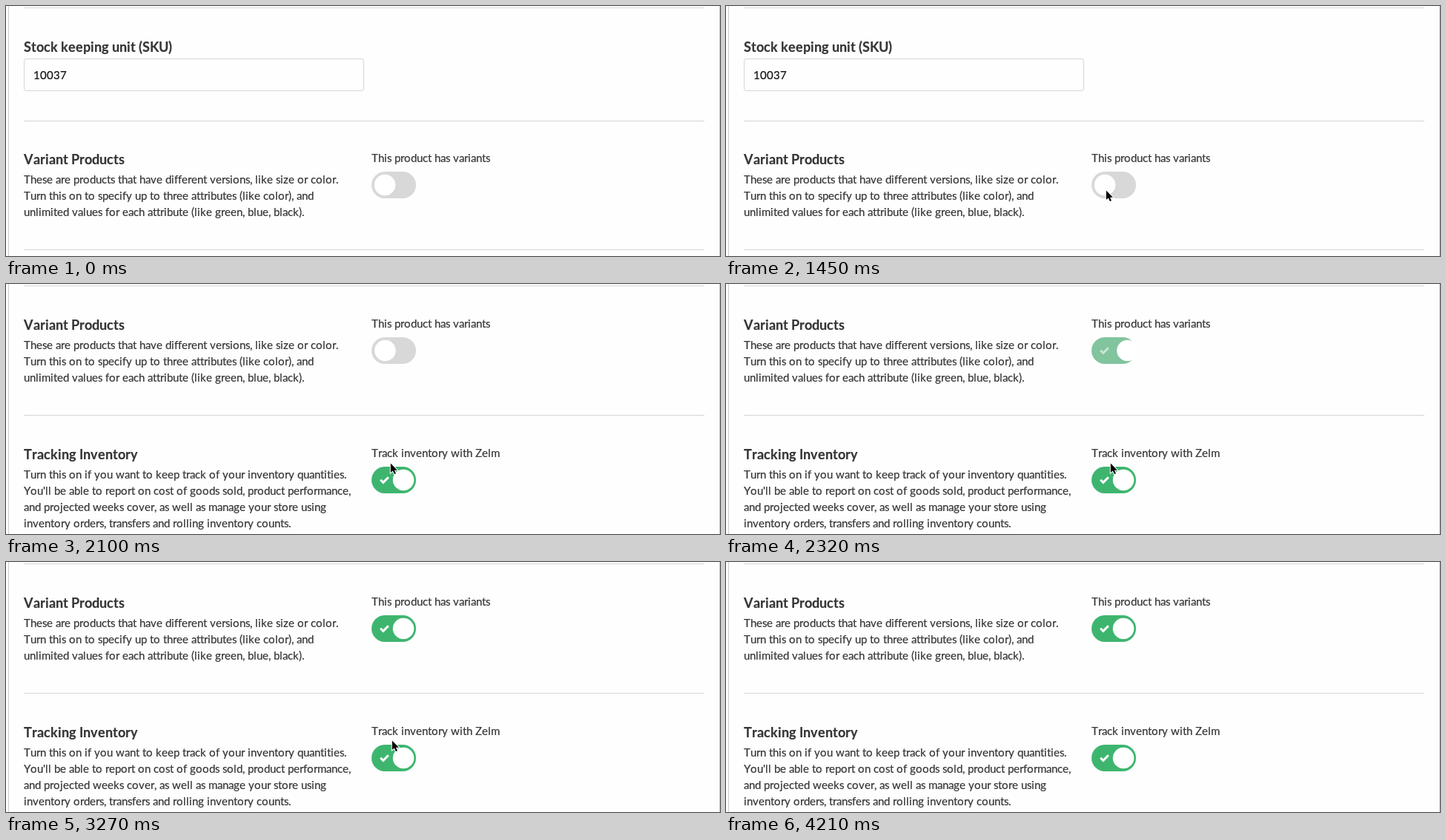
An HTML page that plays this animation: 963 px wide and 338 px high, repeating every 4.56 s.

```html
<!DOCTYPE html>
<html lang="en">
<head>
<meta charset="utf-8">
<title>Product variants</title>
<style>
  html, body { margin: 0; width: 100%; height: 100%; overflow: hidden; background: #fefefe; }
  svg { display: block; width: 100%; height: 100%; }
  text {
    font: 15px Lato, sans-serif; font-kerning: none; font-variant-ligatures: none;
    fill: #363636; stroke: #363636; stroke-width: .2px; white-space: pre;
  }
  .head { font-size: 18px; font-weight: 700; }
  .value { fill: #111; stroke: #111; }
  .rule { fill: none; stroke: #d6d6d6; }
  .frame { stroke: #cdcdcd; }
</style>
</head>
<body>
<svg id="stage" viewBox="0 0 963 338" xmlns="http://www.w3.org/2000/svg"></svg>
<script>
const LOOP = 4560, CLICK = 2100, SWITCH = 390, SCROLL = 152;
const LEAVE = 3270, GONE = 4210, TICK = 400 / 7;
const OFF = [216, 216, 216], ON = [62, 181, 111];

const ruler = document.createElement('canvas').getContext('2d');

// Letters sit on whole pixels: every advance is rounded
function spread(x, s, size, weight) {
  ruler.font = `${weight} 1000px Lato, sans-serif`;
  return [...s].map(c => {
    const at = x;
    x += Math.round(ruler.measureText(c).width * size / 1000);
    return at;
  }).join(' ');
}

function text(x, y, s, cls = '') {
  const [size, weight] = cls === 'head' ? [18, 700] : [15, 400];
  return `<text class="${cls}" x="${spread(x, s, size, weight)}" y="${y}">${s}</text>`;
}

const rule = y => `<path class="rule" d="M24 ${y + .5}H942"/>`;
const lines = (y, rows) => rows.map((s, i) => text(24, y + 22 * i, s)).join('');
const toggle = (y, id) => `<g id="${id}" transform="translate(493 ${y})">
  <rect class="track" width="60" height="36" rx="18"/>
  <path class="tick" d="M12.1 17.7l3.7 3.7 7-7.2" fill="none" stroke="#fff" stroke-width="3"/>
  <circle class="knob" cy="18" r="14.3" fill="#fff"/></g>`;

stage.innerHTML = `
  <path class="rule frame" d="M3.5 0V338M962.5 0V338"/>
  ${rule(2)}
  <g id="sku">
    ${text(24, 62, 'Stock keeping unit (SKU)', 'head')}
    <rect class="rule" x="24.5" y="71.5" width="458" height="43" rx="2.5"/>
    ${text(37, 99, '10037', 'value')}
    ${rule(155)}
  </g>
  <g id="variants">
    ${text(24, 214, 'Variant Products', 'head')}
    ${lines(240, [
      'These are products that have different versions, like size or color.',
      'Turn this on to specify up to three attributes (like color), and',
      'unlimited values for each attribute (like green, blue, black).'])}
    ${text(493, 211, 'This product has variants')}
    ${toggle(224, 'variantSwitch')}
    ${rule(329)}
  </g>
  <g id="tracking">
    ${text(24, 237, 'Tracking Inventory', 'head')}
    ${lines(263, [
      'Turn this on if you want to keep track of your inventory quantities.',
      "You'll be able to report on cost of goods sold, product performance,",
      'and projected weeks cover, as well as manage your store using',
      'inventory orders, transfers and rolling inventory counts.'])}
    ${text(493, 234, 'Track inventory with Zelm')}
    ${toggle(247, 'trackSwitch')}
  </g>
  <g id="cursor">
    <path id="arrow" d="M.8 -.5V12.1L3.7 9.5 5.8 14.1 7.9 13.2 5.9 8.7H9.8Z"
      stroke="#fff" stroke-width="2" paint-order="stroke"/>
    <g id="beam" fill="none">
      <path d="M0 -6V6" stroke="#fff" stroke-width="3"/>
      <path d="M-3.5 -7.5H-2Q0 -7.5 0 -5.5Q0 -7.5 2 -7.5H3.5M0 -5.5V5.5M-3.5 7.5H-2Q0 7.5 0 5.5Q0 7.5 2 7.5H3.5M-2 2.5H2" stroke="#111"/>
    </g>
  </g>`;

// Pointer path: time, x, y
const arrive = [
  [1020, 452, 337], [1100, 462, 318], [1270, 494, 272], [1390, 508, 254],
  [1500, 516, 246], [1570, 517, 244], [1750, 518, 243]];
const depart = [
  [3270, 520, 242], [3384, 540, 238], [3498, 582, 231], [3670, 655.5, 220.5],
  [3784, 723, 208], [3841, 752, 209], [3956, 815, 232], [4070, 865, 275], [4185, 897, 334]];

function along(keys, t) {
  const i = keys.findIndex(k => k[0] > t);
  if (i < 0) return keys[keys.length - 1].slice(1);
  if (i === 0) return keys[0].slice(1);
  const [t0, x0, y0] = keys[i - 1], [t1, x1, y1] = keys[i];
  const u = (t - t0) / (t1 - t0);
  return [x0 + (x1 - x0) * u, y0 + (y1 - y0) * u];
}

// The pointer moves in discrete ticks
const hold = (t, start) => start + Math.floor((t - start) / TICK + .01) * TICK;

function pointer(t) {
  if (t >= LEAVE) return along(depart, hold(t, LEAVE));
  return along(arrive, t < 1100 ? 1020 : hold(t, 1100));
}

const show = (el, on) => el.setAttribute('display', on ? 'inline' : 'none');

function setSwitch(el, p) {
  const q = p - 1, slide = 1 + 3.8 * q ** 3 + 2.8 * q ** 2;
  const color = OFF.map((c, i) => Math.round(c + (ON[i] - c) * p));
  el.querySelector('.track').setAttribute('fill', `rgb(${color})`);
  el.querySelector('.tick').setAttribute('opacity', p);
  el.querySelector('.knob').setAttribute('cx', 18 + 25 * slide);
}

function draw(t) {
  const clicked = t >= CLICK;
  show(sku, !clicked);
  show(tracking, clicked);
  variants.setAttribute('transform', `translate(0 ${clicked ? -SCROLL : 0})`);
  setSwitch(variantSwitch, Math.min(1, Math.max(0, (t - CLICK) / SWITCH)));

  const [x, y] = pointer(t);
  const overText = t >= LEAVE && x < 667 && y > 218 && y < 240;
  show(cursor, t >= 1020 && t < GONE);
  show(arrow, !overText);
  show(beam, overText);
  cursor.setAttribute('transform', `translate(${Math.round(x)} ${Math.round(y)})`);
}

setSwitch(trackSwitch, 1);
const start = performance.now();
function tick() {
  draw((performance.now() - start) % LOOP);
  requestAnimationFrame(tick);
}
tick();
</script>
</body>
</html>
```
